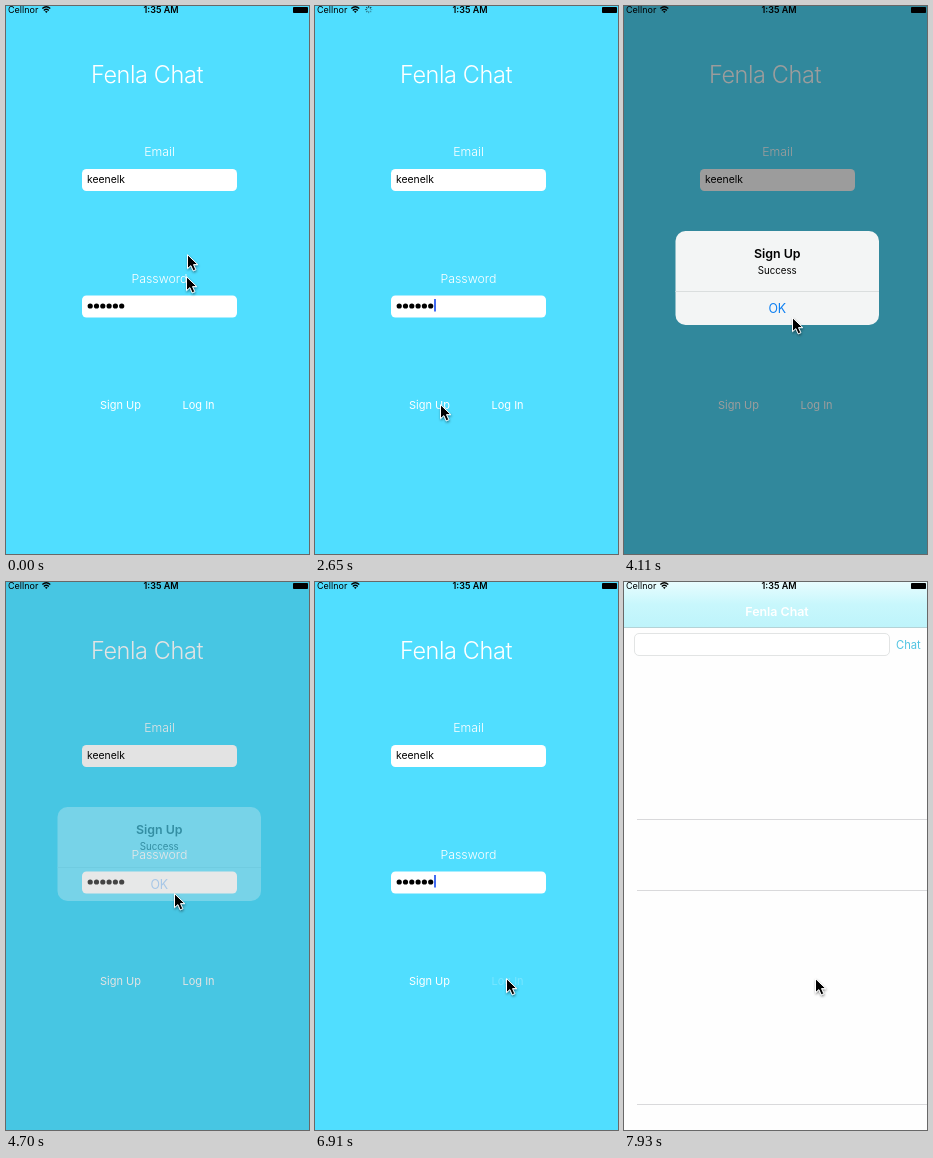
Recreate the animation shown at these times as an HTML page. Size 303x548 px, loop 8 s.

```html
<!DOCTYPE html>
<html lang="en">
<head>
<meta charset="utf-8">
<title>Sign up and log in</title>
<style>
  html, body { margin: 0; width: 100%; height: 100%; overflow: hidden; background: #50deff; }
  svg { display: block; width: 303px; height: 548px; font-family: Inter, Roboto, sans-serif; }
  .mid { text-anchor: middle; }
  .label { font-size: 12.3px; font-weight: 300; }
  .button { font-size: 11px; }
  .bold { font-weight: 600; }
</style>
</head>
<body>
<svg viewBox="0 0 303 548">
  <defs>
    <linearGradient id="barFill" x2="0" y2="1">
      <stop offset="0" stop-color="#e8fcfe"/>
      <stop offset=".5" stop-color="#c8f7fc"/>
      <stop offset="1" stop-color="#bef4fb"/>
    </linearGradient>
    <filter id="soft" x="-50%" y="-50%" width="200%" height="200%">
      <feDropShadow dx="0.5" dy="1.5" stdDeviation="1" flood-opacity=".45"/>
    </filter>
    <path id="arrow" d="M.5 .7V14.6L3.9 11.6L6.2 16.8L8.8 15.7L6.5 10.6H10.8Z"
      fill="#000" stroke="#fff" stroke-linejoin="round" filter="url(#soft)"/>
  </defs>

  <g id="login">
    <rect width="303" height="548" fill="#50deff"/>
    <g fill="#fff">
      <text class="mid" x="141" y="77" font-size="23.5" font-weight="300" letter-spacing="-.4">Fenla Chat</text>
      <text class="mid label" x="153.5" y="150">Email</text>
      <text class="mid label" x="153.5" y="277">Password</text>
      <text class="button" id="signUp" x="94" y="403">Sign Up</text>
      <text class="button" id="logIn" x="176.5" y="403">Log In</text>
      <rect x="76" y="163" width="155" height="22" rx="4.5"/>
      <rect x="76" y="289.5" width="155" height="22" rx="4.5"/>
    </g>
    <text x="81" y="177" font-size="10.4">keenelk</text>
    <g id="dots"></g>
    <rect id="caret" x="119" y="293" width="2" height="12.5" fill="#426bf2"/>
  </g>

  <g id="sheet">
    <rect width="303" height="548" fill="#fefefe"/>
    <rect width="303" height="45" fill="url(#barFill)"/>
    <path d="M0 45.5H303" stroke="#b4d3d7"/>
    <text class="mid bold" x="153" y="33.5" font-size="12.4" fill="#fff">Fenla Chat</text>
    <rect x="10.5" y="51.5" width="255" height="22" rx="4.5" fill="#fff" stroke="#e2e4e4"/>
    <text x="272" y="67" font-size="11.2" fill="#52c4e2">Chat</text>
    <path d="M13 237.5H303M13 308.5H303M13 522.5H303" stroke="#d9d9db"/>
  </g>

  <g id="status">
    <text x="2" y="7" font-size="9">Cellnor</text>
    <text class="mid bold" x="155" y="7" font-size="9">1:35 AM</text>
    <rect x="287" y="1" width="15" height="6" rx=".8"/>
    <g fill="none" stroke="#000" stroke-width="1.3">
      <path d="M36.3 2.5Q40.3 -1 44.3 2.5M37.8 4.4Q40.3 2.2 42.8 4.4"/>
    </g>
    <path d="M38.9 5.5Q40.3 4.4 41.7 5.5L40.3 7Z"/>
    <g id="spinner" stroke="#000"></g>
  </g>

  <rect id="dim" width="303" height="548"/>
  <g id="alert">
    <rect x="51.5" y="225" width="203.5" height="94" rx="10" fill="#f3f5f5"/>
    <path id="pressed" d="M51.5 286H255V309Q255 319 245 319H61.5Q51.5 319 51.5 309Z" fill="#dfe4e5"/>
    <path d="M51.5 285.5H255" stroke="#dadede"/>
    <text class="mid bold" x="153.3" y="252" font-size="12.4">Sign Up</text>
    <text class="mid" x="153.3" y="268" font-size="9.7">Success</text>
    <text class="mid" x="153.3" y="307" font-size="12.4" fill="#0f80f2">OK</text>
  </g>

  <use id="extra" href="#arrow" x="181" y="248"/>
  <use id="pointer" href="#arrow"/>
</svg>
<script>
const LOOP = 8000, TICK = 147, LAST = 54;
const el = id => document.getElementById(id);
const show = (id, opacity) => { el(id).style.opacity = Number(opacity); };
const within = (n, from, to) => n >= from && n <= to;

// Pointer path: tick, x, y
const path = [
  [1, 180, 270], [3, 168, 298], [6, 133, 378], [8, 125, 398],
  [23, 125, 398], [25, 138, 372], [27, 165, 320], [28, 168, 311],
  [34, 168, 311], [40, 182, 369], [42, 190, 391], [45, 191, 396]
];

function pointerAt(n) {
  const i = path.findIndex(p => p[0] >= n);
  if (i < 1) return (i ? path[path.length - 1] : path[0]).slice(1);
  const [n0, x0, y0] = path[i - 1], [n1, x1, y1] = path[i];
  const u = (n - n0) / (n1 - n0);
  return [x0 + (x1 - x0) * u, y0 + (y1 - y0) * u];
}

function caretOn(n, ms) {
  if (n < 1 || within(n, 19, 32)) return false;
  return (ms - (n < 19 ? 160 : 4840)) % 1000 < 510;
}

for (let i = 0; i < 6; i++) {
  el('dots').innerHTML += `<circle cx="${84.2 + i * 6.3}" cy="300" r="2.6"/>`;
}
for (let i = 0; i < 8; i++) {
  el('spinner').innerHTML +=
    `<path d="M0 -1.7V-3.6" transform="rotate(${i * 45})" opacity="${0.25 + i * 0.08}"/>`;
}

function draw(t) {
  const n = Math.min(LAST, Math.floor((t + 10) / TICK));
  const ms = n * TICK;

  show('extra', n === 0);
  const [x, y] = pointerAt(n);
  el('pointer').setAttribute('transform', `translate(${x} ${y})`);

  show('caret', caretOn(n, ms));
  show('signUp', n === 11 ? 0.2 : 1);
  show('logIn', within(n, 46, 47) ? 0.22 : n === 48 ? 0.7 : 1);

  show('spinner', within(n, 14, 18) || within(n, 49, 50));
  el('spinner').setAttribute('transform', `translate(53.7 3.6) rotate(${n * 45})`);

  // The alert pops in at tick 19 and fades out at tick 32
  const level = n === 19 ? 0.5 : within(n, 20, 31) ? 1 : n === 32 ? 0.28 : 0;
  show('alert', level);
  show('dim', level * 0.39);
  show('pressed', n === 31);
  const size = n === 19 ? 1.08 : 1;
  el('alert').setAttribute('transform', `translate(153.3 272) scale(${size}) translate(-153.3 -272)`);

  // The chat sheet rises from the bottom
  const u = Math.min(1, Math.max(0, (ms - 7400) / 530));
  el('sheet').setAttribute('transform', `translate(0 ${548 * (1 - u) ** 3})`);
  show('sheet', n > 50);
}

const start = performance.now();
function loop() {
  draw((performance.now() - start) % LOOP);
  requestAnimationFrame(loop);
}
loop();
</script>
</body>
</html>
```
